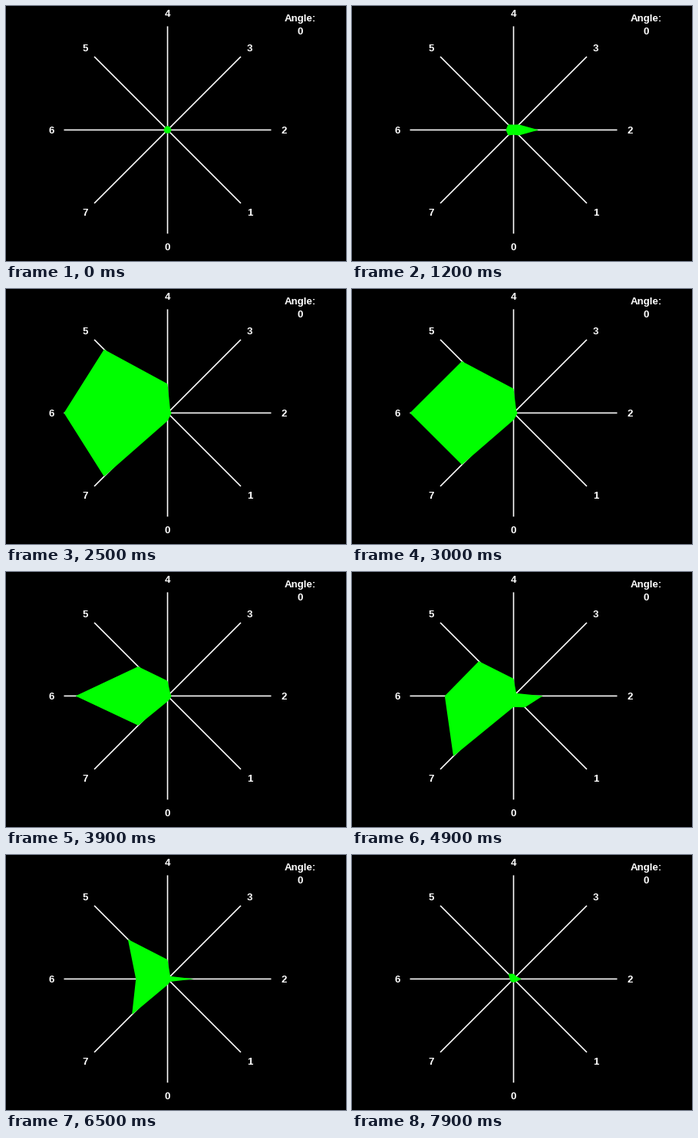
Animation, 443 px wide and 332 px high, one loop 8000 ms. Source, as a matplotlib script:

```python
import matplotlib.pyplot as plt
import numpy as np
from matplotlib.animation import FuncAnimation

W, H, DPI = 443, 332, 64
PX = 72 / DPI  # points per pixel
CENTRE = np.array([210.5, 161.4])
SPOKE, LABEL = 135, 151.5
STEP, FRAMES = 100, 80

angles = np.arange(8) * np.pi / 4
DIRS = np.column_stack([np.sin(angles), np.cos(angles)])

fig = plt.figure(figsize=(W / DPI, H / DPI), dpi=DPI, facecolor="black")
ax = fig.add_axes([0, 0, 1, 1])
ax.set_xlim(0, W)
ax.set_ylim(H, 0)
ax.axis("off")


def label(x, y, text):
    ax.text(x, y + 4.6, text, color="white", ha="center", va="baseline",
            family="Liberation Sans", weight="bold", size=13.2 * PX)


def pulse(t, start, full, hold, end):
    """Rise from 0 to 1, stay, and fall back, all in ms."""
    return np.interp(t, [start, full, hold, end], [0, 1, 1, 0])


def reach(t):
    """Length along each spoke, 0 to 7, in pixels."""
    rest = 5 + 5 * pulse(t, 300, 1200, 1200, 1900)
    right = pulse(t, 1200, 1900, 1950, 2150)
    left = pulse(t, 1900, 2500, 3400, 7700)
    flutter = 0.9 + 0.1 * np.cos(2 * np.pi * (t - 2500) / 900)
    wings = 112 * flutter * pulse(t, 1870, 2500, 3400, 4500)

    r1 = rest + 121 * right + 16 * pulse(t, 4000, 4900, 4900, 6300)
    r2 = (rest + 40 * pulse(t, 300, 1900, 1900, 2300)
          + 43 * pulse(t, 3900, 5200, 5700, 8200))
    r3 = rest + 51 * right
    r5 = rest + wings + 118 * pulse(t, 4500, 5300, 5400, 8000)
    r6 = rest + 130 * left
    r7 = rest + wings + 106 * pulse(t, 3900, 4900, 5600, 7700)
    # the upright spokes follow their neighbours
    r0 = 3 + 0.28 * r1 + 0.05 * r7
    r4 = 4 + 0.29 * r5
    return np.array([r0, r1, r2, r3, r4, r5, r6, r7])


def shape(frame):
    return CENTRE + DIRS * reach(frame * STEP)[:, None]


for i, d in enumerate(DIRS):
    ax.plot(*zip(CENTRE, CENTRE + d * SPOKE), color="white", lw=1.6 * PX,
            solid_capstyle="butt", snap=False, zorder=1)
    label(*(CENTRE + d * LABEL), str(i))
label(383.5, 15.3, "Angle:")
label(383, 32, "0")

blob = plt.Polygon(shape(0), closed=True, facecolor="#00ff00",
                   edgecolor="none", zorder=2)
ax.add_patch(blob)


def update(frame):
    blob.set_xy(shape(frame))
    return [blob]


anim = FuncAnimation(fig, update, frames=FRAMES, interval=STEP,
                     repeat=True, repeat_delay=0, blit=False)
plt.show()
```
